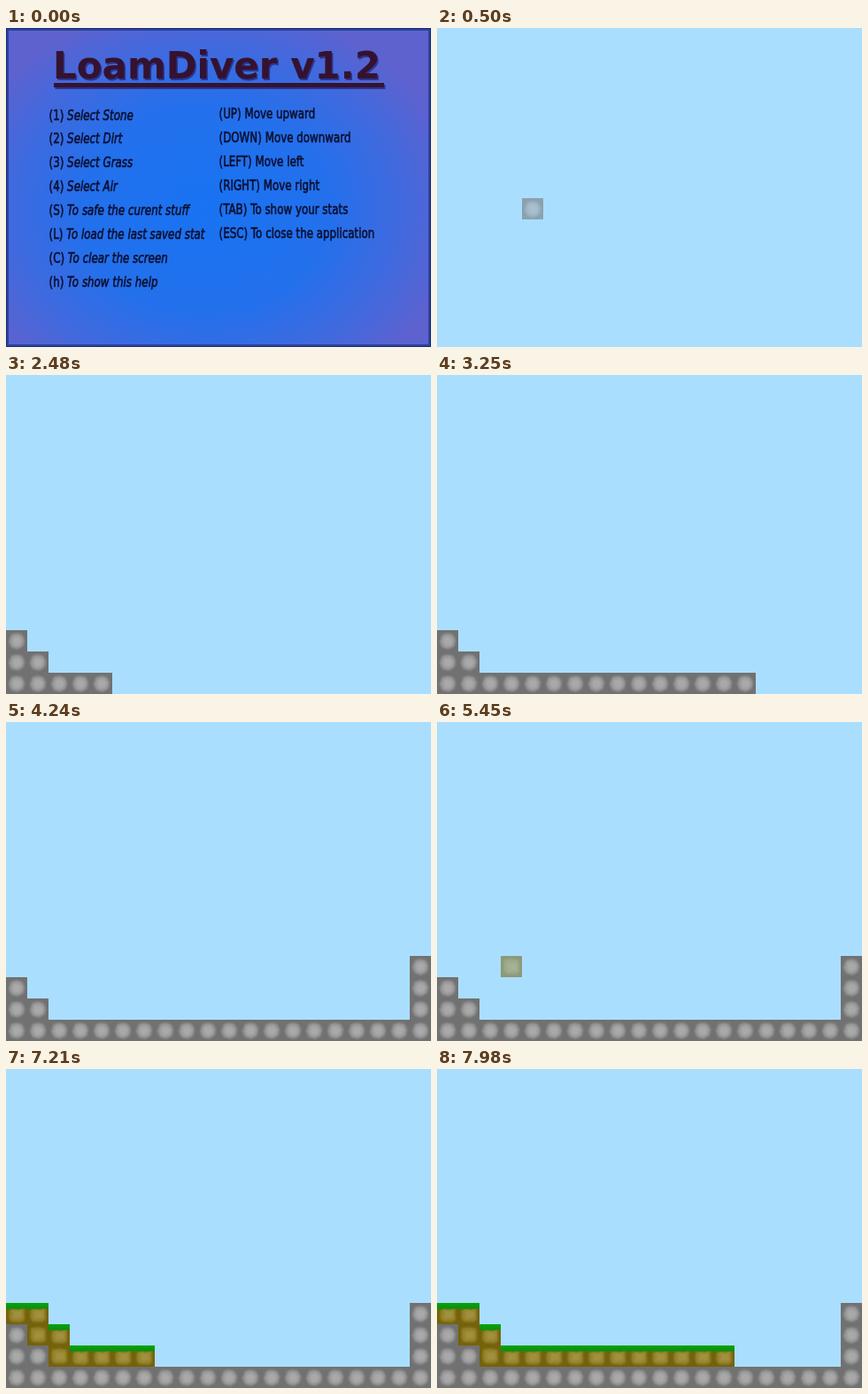
An HTML page for the animation above (8000 ms loop, 480 by 360 pixels).

```html
<!DOCTYPE html>
<html lang="en">
<head>
<meta charset="utf-8">
<title>Block builder</title>
<style>
html, body { margin: 0; width: 100%; height: 100%; overflow: hidden; background: #aadeff; }
svg { display: block; width: 480px; height: 360px; }
.menu { font: 16px "DejaVu Sans", sans-serif; fill: #0c1030; stroke: #0c1030; stroke-width: .65; white-space: pre; }
.title { font: bold 42px "DejaVu Sans", sans-serif; }
</style>
</head>
<body>
<svg viewBox="0 0 480 360" xmlns="http://www.w3.org/2000/svg">
  <defs>
    <filter id="soft" x="-30%" y="-30%" width="160%" height="160%"><feGaussianBlur stdDeviation="1.2"/></filter>
    <filter id="haze" x="-30%" y="-30%" width="160%" height="160%"><feGaussianBlur stdDeviation=".7"/></filter>
    <radialGradient id="glow" gradientUnits="userSpaceOnUse" cx="0" cy="0" r="1" gradientTransform="translate(225 205) scale(285 235)">
      <stop offset="0" stop-color="#1873f2"/>
      <stop offset=".5" stop-color="#2470ec"/>
      <stop offset=".8" stop-color="#4369dd"/>
      <stop offset="1" stop-color="#5d62cf"/>
    </radialGradient>
    <linearGradient id="turf" x1="0" y1="0" x2="0" y2="1">
      <stop offset="0" stop-color="#08a40e"/>
      <stop offset=".6" stop-color="#0a920c"/>
      <stop offset="1" stop-color="#4a7409" stop-opacity=".3"/>
    </linearGradient>
    <clipPath id="cell"><rect width="24" height="24"/></clipPath>
    <g id="stone" clip-path="url(#cell)">
      <rect width="24" height="24" fill="#717171"/>
      <path d="M6 5L12 3.5L18 5L21 11L19.5 18L13 21.5L6 19.5L3 13Z" fill="#989898" filter="url(#soft)"/>
      <path d="M8 8L14 7L18 11L16 17L10 18L7 14Z" fill="#a9a9a9" filter="url(#soft)"/>
    </g>
    <g id="dirt" clip-path="url(#cell)">
      <rect width="24" height="24" fill="#74620c"/>
      <path d="M4 4.5L13 3.5L20.5 5L21 18L17 20.5L6 20L3.5 16Z" fill="#95832b" filter="url(#soft)"/>
      <path d="M8 8L18 8L18 16L8 17Z" fill="#a09040" filter="url(#soft)"/>
    </g>
    <g id="grass" clip-path="url(#cell)">
      <use href="#dirt" y="1"/>
      <path d="M0 0H24V7L19 6.5L14 8L8 7L4 9L0 8Z" fill="url(#turf)"/>
    </g>
  </defs>
  <rect width="480" height="360" fill="#aadeff"/>
  <g id="world"></g>
  <use id="cursor" opacity=".55"/>
  <g id="help">
    <rect width="480" height="360" fill="url(#glow)"/>
    <rect x="1.5" y="1.5" width="477" height="357" fill="none" stroke="#2b429b" stroke-width="3" filter="url(#haze)"/>
    <rect x=".5" y=".5" width="479" height="359" fill="none" stroke="#1c2f78"/>
    <g fill="#202070" opacity=".7" filter="url(#haze)" transform="translate(1.5 2)">
      <text class="title" x="53" y="57">LoamDiver v1.2</text>
      <rect x="54" y="62" width="373" height="5"/>
    </g>
    <g fill="#35122f">
      <text class="title" x="53" y="57">LoamDiver v1.2</text>
      <rect x="54" y="62" width="373" height="5"/>
    </g>
    <g id="menu"></g>
  </g>
</svg>
<script>
const NS = "http://www.w3.org/2000/svg";
const LOOP = 8000, STEP = 110, SIZE = 24;
const byId = id => document.getElementById(id);

function add(parent, tag, attrs, text = "") {
  const el = document.createElementNS(NS, tag);
  for (const key in attrs) el.setAttribute(key, attrs[key]);
  el.textContent = text;
  return parent.appendChild(el);
}

// Help screen: one horizontally condensed group per column
function menuColumn(x, y, lines, italic) {
  const g = add(byId("menu"), "g", { class: "menu", transform: `translate(${x} ${y}) scale(.743 1)` });
  lines.forEach(([key, label], i) => {
    const line = add(g, "text", { y: i * 27 }, `(${key}) `);
    add(line, "tspan", { "font-style": italic ? "italic" : "normal" }, label);
  });
}
menuColumn(48.5, 103.5, [
  ["1", "Select Stone"], ["2", "Select Dirt"], ["3", "Select Grass"], ["4", "Select Air"],
  ["S", "To safe the curent stuff"], ["L", "To load the last saved stat"],
  ["C", "To clear the screen"], ["h", "To show this help"]
], true);
menuColumn(240.5, 102, [
  ["UP", "Move upward"], ["DOWN", "Move downward"], ["LEFT", "Move left"],
  ["RIGHT", "Move right"], ["TAB", "To show your stats"], ["ESC", "To close the application"]
], false);

// Placed blocks: each appears at its time and stays
const blocks = [];
function place(time, kind, col, row) {
  const el = add(byId("world"), "use", { href: "#" + kind, x: col * SIZE, y: row * SIZE });
  blocks.push({ time, el });
}
place(1270, "stone", 0, 12);
place(1380, "stone", 0, 13);
place(1710, "stone", 1, 13);
place(1820, "stone", 1, 14);
place(2040, "stone", 0, 14);
for (let col = 2; col < 5; col++) place(2260 + (col - 2) * STEP, "stone", col, 14);
// The floor sweep covers 15 columns in 11 steps
for (let n = 1, col = 5; n <= 11; n++)
  for (const end = Math.round(4 + n * 15 / 11); col <= end; col++)
    place(2480 + n * STEP, "stone", col, 14);
place(3910, "stone", 19, 13);
place(4020, "stone", 19, 12);
place(4240, "stone", 19, 11);
place(5670, "dirt", 1, 12);
place(6000, "grass", 0, 11);
place(6220, "grass", 1, 11);
place(6330, "grass", 2, 12);
place(6550, "dirt", 2, 13);
place(6660, "grass", 3, 13);
place(6880, "grass", 4, 13);
for (let col = 5; col < 14; col++) place(7100 + (col - 5) * STEP, "grass", col, 13);

// Translucent cursor block: time, kind, column, row
const moves = [
  [500, "stone", 4, 8], [720, "stone", 3, 9], [830, "stone", 2, 10], [940, "stone", 1, 11],
  [1160, "stone", 0, 12], [1270],
  [4680, "stone", 18, 11], [4790, "stone", 16, 11], [4900, "stone", 14, 10], [5010, "stone", 11, 10],
  [5230, "stone", 7, 10], [5340, "stone", 3, 11], [5450, "dirt", 3, 11], [5560, "dirt", 2, 12],
  [5670], [5780, "grass", 1, 11], [5890, "grass", 0, 11], [6000]
];
const show = (el, on) => el.setAttribute("visibility", on ? "visible" : "hidden");

function draw(t) {
  show(byId("help"), t < 500);
  for (const b of blocks) show(b.el, t >= b.time);
  const [, kind, col, row] = moves.filter(m => m[0] <= t).pop() || [];
  const cursor = byId("cursor");
  show(cursor, kind);
  if (kind) {
    cursor.setAttribute("href", "#" + kind);
    cursor.setAttribute("x", col * SIZE);
    cursor.setAttribute("y", row * SIZE);
  }
}

function tick() {
  draw(performance.now() % LOOP);
  requestAnimationFrame(tick);
}
tick();
</script>
</body>
</html>
```
